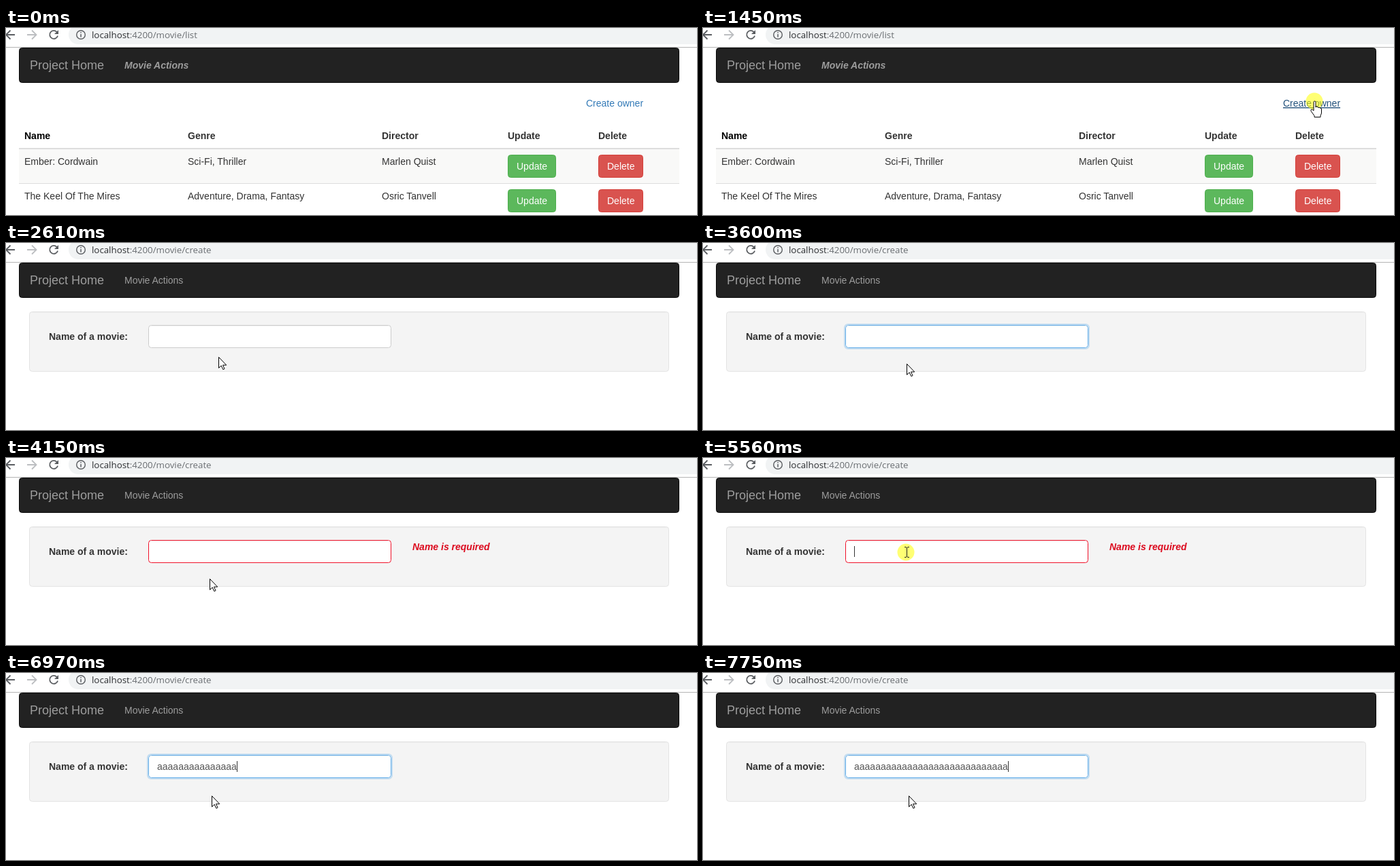
Write an HTML page that moves like this. It is 1015 px wide and 276 px high and loops after 8000 ms.

```html
<!DOCTYPE html>
<html lang="en">
<head>
<meta charset="utf-8">
<title>Movie form</title>
<style>
  html, body { margin: 0; width: 100%; height: 100%; overflow: hidden; background: #fff; }
  svg { display: block; width: 100%; height: 100%; }
  text { font: 14px "Liberation Sans", Arial, sans-serif; fill: #333; white-space: pre; }
  .bold { font-weight: bold; }
  .active { font-weight: bold; font-style: italic; }
  .nav { fill: #9d9d9d; }
  .brand { font-size: 18px; }
  .url { font: 13.3px "Open Sans", "Noto Sans", sans-serif; fill: #6a6e72; }
  .host { fill: #2b2d30; }
  .white { fill: #fff; }
  .icon { fill: none; stroke: #5a5d61; stroke-width: 1.8; }
  .cursor { fill: #fff; stroke: #000; stroke-linejoin: round; }
</style>
</head>
<body>
<svg viewBox="0 0 1015 276">
  <rect x="92" y="-4" width="960" height="28" rx="14" fill="#f1f3f4"/>
  <path d="M0 28.5H1015" stroke="#b4b4b4"/>
  <g class="icon">
    <path d="M13 10H0M6.5 3.5L0 10L6.5 16.5"/>
    <path d="M31 10H44M38 3.5L44.5 10L38 16.5" stroke="#bcbec1"/>
    <path d="M74.6 5.8A6 6 0 1 0 76 11.5"/>
    <path d="M77 3V9H71Z" fill="#5a5d61" stroke="none"/>
    <circle cx="110" cy="10" r="6.3" stroke-width="1.4"/>
    <path d="M110 9V13.5M110 6V7.6" stroke-width="1.5"/>
  </g>
  <text class="url" x="126" y="15"><tspan class="host">localhost</tspan>:4200/movie/<tspan id="route"></tspan></text>

  <rect x="19.5" y="29.5" width="969" height="51" rx="4" fill="#222" stroke="#090909"/>
  <text class="nav brand" x="35" y="61">Project Home</text>
  <text class="nav" id="actions" x="174" y="60">Movie Actions</text>

  <g id="list">
    <text id="link" x="852" y="116">Create owner</text>
    <rect x="19" y="177" width="970" height="2" fill="#ddd"/>
    <rect x="19" y="179" width="970" height="50" fill="#f9f9f8"/>
    <rect x="19" y="229" width="970" height="1" fill="#ddd"/>
    <g id="cells"></g>
  </g>

  <g id="form">
    <rect x="34.5" y="101.5" width="939" height="88" rx="4" fill="#f4f4f4" stroke="#e3e3e3"/>
    <path d="M37 102.5H971" stroke="#ececec"/>
    <text class="bold" x="63" y="143">Name of a movie:</text>
    <rect id="glow" x="208" y="120" width="359" height="36" rx="5" fill="none" stroke="#66afe9" stroke-width="2"/>
    <rect id="input" x="209.5" y="121.5" width="356" height="33" rx="4" fill="#fff"/>
    <path d="M212 122.5H563" stroke="#f1f1f1"/>
    <text id="value" x="222" y="143" style="fill:#555"></text>
    <rect id="caret" y="130" width="1" height="16" fill="#333"/>
    <text class="active" id="error" x="597" y="136" style="fill:#dc0a1e">Name is required</text>
  </g>

  <circle id="click" r="12.5" fill="#ff0" opacity=".55"/>
  <g id="mouse">
    <path id="arrow" class="cursor" d="M.5.5V16.5L4.2 13L6.8 18.7L9 17.7L6.5 12.2H11.7Z"/>
    <path id="hand" class="cursor" d="M-2 1.5Q-2 0-.5 0T1 1.5V9Q1 7.5 3 8Q4.5 8.3 4.5 9.5Q6 8.5 7.5 10Q9.5 9.8 9.5 12V17Q9.5 19 8 21V23.5H-1V21.5L-6 14.5Q-6.5 12-4.5 12L-2 14Z"/>
    <path id="beam" fill="none" stroke="#222" d="M-3-7.5H-1L.5-6.5L2-7.5H4M.5-6.5V6.5M-3 7.5H-1L.5 6.5L2 7.5H4"/>
  </g>
</svg>
<script>
const LOOP = 8000, PAGE_SWITCH = 1530, FIRST_KEY = 6020;
const $ = id => document.getElementById(id);
const show = (id, on) => $(id).style.display = on ? '' : 'none';

const columns = [27, 267, 552, 737, 870];
const label = (x, y, text, cls = '') => `<text x="${x}" y="${y}" class="${cls}">${text}</text>`;
const button = (x, y, width, text, fill, stroke) =>
  `<rect x="${x + .5}" y="${y + .5}" width="${width - 1}" height="33" rx="4" fill="${fill}" stroke="${stroke}"/>` +
  label(x + 13, y + 22, text, 'white');
const row = (y, cells) => cells.map((text, i) => label(columns[i], y + 15, text)).join('') +
  button(737, y, 71, 'Update', '#5cb85c', '#4cae4c') +
  button(870, y, 66, 'Delete', '#d9534f', '#d43f3a');

$('cells').innerHTML =
  ['Name', 'Genre', 'Director', 'Update', 'Delete'].map((text, i) => label(columns[i], 164, text, 'bold')).join('') +
  row(187, ['Ember: Cordwain', 'Sci-Fi, Thriller', 'Marlen Quist']) +
  row(238, ['The Keel Of The Mires', 'Adventure, Drama, Fantasy', 'Osric Tanvell']);
$('cells').firstChild.style.fill = '#000';

// Each move advances through evenly spaced points in discrete steps.
const moves = [
  { from: 680, to: 990, steps: 5, points: [[968, 113], [899, 108]] },
  { from: 1530, to: 1530, steps: 1, points: [[898, 108]] },
  { from: 1990, to: 2760, steps: 11, points: [[890, 112], [760, 165], [560, 210], [400, 217], [312, 168], [311, 146]] },
  { from: 2840, to: 2910, steps: 2, points: [[310, 143], [309, 140]] },
  { from: 3310, to: 3520, steps: 4, points: [[306, 148], [299, 178]] },
  { from: 5010, to: 5160, steps: 3, points: [[300, 166], [299, 150], [299, 139]] },
  { from: 5940, to: 6100, steps: 3, points: [[300, 153], [302, 181]] }
];
const clicks = [1450, 3080, 4000, 5560];
const borders = [[-1e3, [204, 204, 204]], [3080, [102, 175, 233]], [4000, [240, 16, 40]], [FIRST_KEY, [102, 175, 233]]];

const clamp = x => Math.max(0, Math.min(1, x));
const mix = (a, b, u) => a.map((v, i) => v + (b[i] - v) * u);
const fade = (t, start) => { const u = clamp((t - start) / 150); return u * (2 - u); };

function stepIndex(t, { from, to, steps }) {
  if (steps < 2) return 0;
  return Math.min(steps - 1, Math.floor((t - from) / (to - from) * (steps - 1) + .03));
}

function mouseAt(t) {
  const move = moves.filter(m => t >= m.from).pop();
  if (!move) return null;
  const { points, steps } = move;
  const place = stepIndex(t, move) / Math.max(1, steps - 1) * (points.length - 1);
  const i = Math.floor(place);
  return mix(points[i], points[Math.min(i + 1, points.length - 1)], place - i).map(Math.round);
}

function typedCount(t) {
  if (t < FIRST_KEY) return 0;
  if (t < 6500) return 1;
  if (t < 7370) return 3 + Math.floor(2.4 * stepIndex(t, { from: 6500, to: 7300, steps: 11 }));
  return t < 7750 ? 28 : 29;
}

function drawMouse(t, onList) {
  const mouse = mouseAt(t);
  show('mouse', mouse);
  const clicked = clicks.some(c => t >= c && t < c + 80);
  show('click', clicked);
  const [x, y] = mouse || [0, 0];
  const hover = onList && y > 100 && y < 122 && x >= 852 && x <= 937;
  const inInput = !onList && x > 209 && x < 566 && y > 121 && y < 155;
  $('mouse').setAttribute('transform', `translate(${x} ${y})`);
  $('click').setAttribute('transform', `translate(${x - 1} ${y})`);
  show('hand', hover);
  show('beam', inInput);
  show('arrow', !hover && !inInput);
  $('link').style.fill = hover ? '#23527c' : '#337ab7';
  $('link').style.textDecoration = hover ? 'underline' : 'none';
}

function drawForm(t) {
  const count = typedCount(t);
  $('value').textContent = 'a'.repeat(count);
  $('caret').setAttribute('x', Math.round(222 + count * 7.786));
  show('caret', (t >= 3080 && t < 3600) || t >= 5560);
  show('error', t >= 4000 && t < FIRST_KEY);
  const color = borders.reduce((c, [start, next]) => mix(c, next, fade(t, start)), [204, 204, 204]);
  $('input').setAttribute('stroke', `rgb(${color.map(Math.round)})`);
  $('glow').setAttribute('opacity', .35 * (fade(t, 3080) - fade(t, 4000) + fade(t, 5560)));
}

function draw(t) {
  const onList = t < PAGE_SWITCH;
  show('list', onList);
  show('form', !onList);
  $('route').textContent = onList ? 'list' : 'create';
  $('actions').setAttribute('class', onList ? 'nav active' : 'nav');
  drawForm(t);
  drawMouse(t, onList);
}

const start = performance.now();
function tick() {
  draw((performance.now() - start) % LOOP);
  requestAnimationFrame(tick);
}
tick();
</script>
</body>
</html>
```
